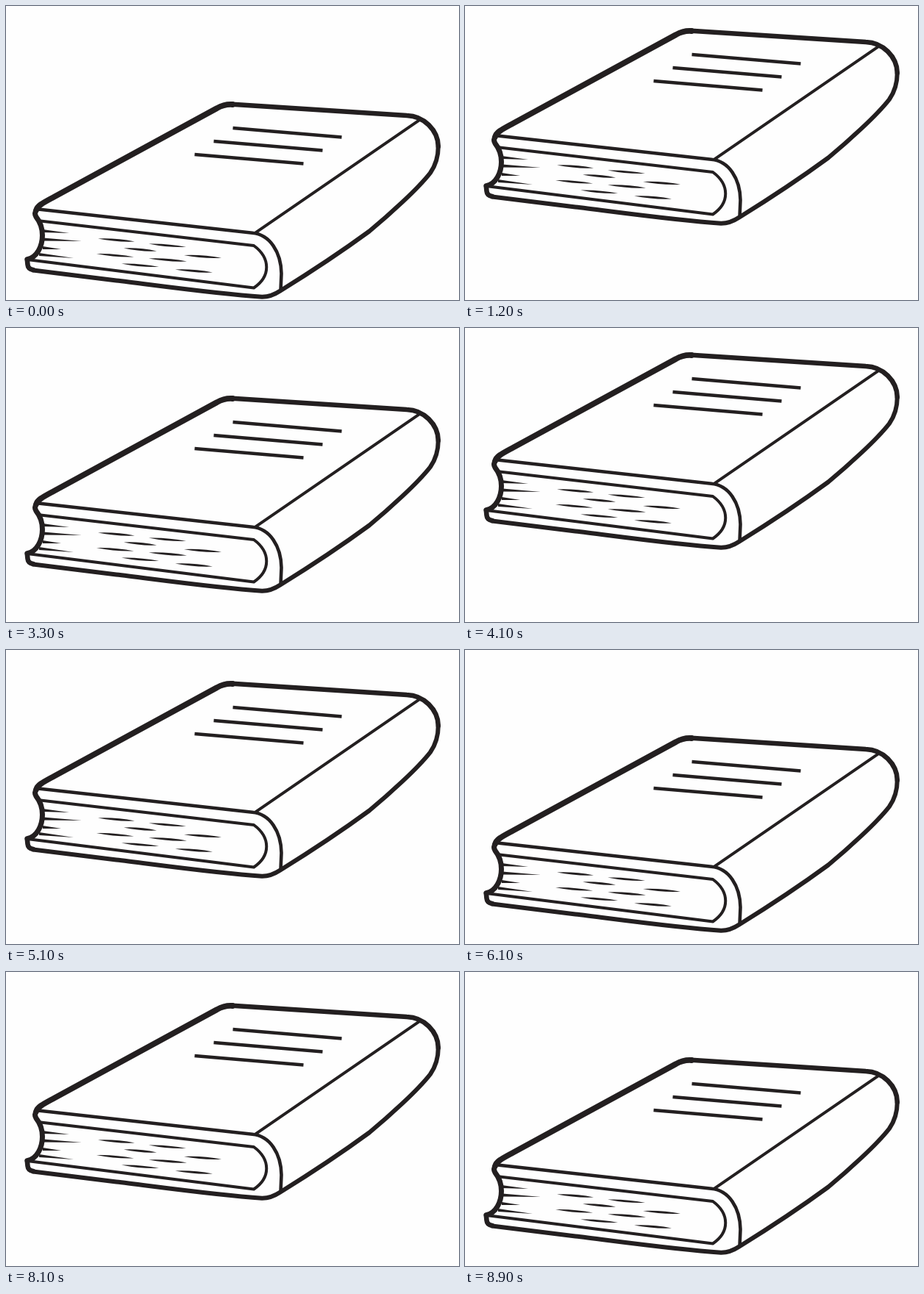
Animation of 616x400 px, one loop 9000 ms. Source, as an HTML page with a canvas:

```html
<!DOCTYPE html>
<html lang="en">
<head>
<meta charset="utf-8">
<title>Bouncing book</title>
<style>
  html, body { margin: 0; width: 100%; height: 100%; overflow: hidden; background: #fefefe; }
  canvas { display: block; }
</style>
</head>
<body>
<canvas id="stage" width="616" height="400"></canvas>
<script>
const ctx = document.getElementById('stage').getContext('2d');
const INK = '#231f20';
const PAPER = '#fefefe';
const PERIOD = 3000;
const STEP = 100;
const HEIGHT = 104;

function stroke(width, path) {
  ctx.lineWidth = width;
  ctx.stroke(new Path2D(path));
}

// Sliver that is thickest in the middle and pointed at both ends.
function sliver(x, y, length, drop) {
  const mx = x + length / 2, my = y + drop / 2;
  ctx.beginPath();
  ctx.moveTo(x, y);
  ctx.quadraticCurveTo(mx, my - 3, x + length, y + drop);
  ctx.quadraticCurveTo(mx, my + 3, x, y);
  ctx.fill();
}

// Wedge that runs out of the concave page edge to a point.
function wedge(x, y, tipX, tipY) {
  ctx.beginPath();
  ctx.moveTo(x, y - 2);
  ctx.lineTo(tipX, tipY);
  ctx.lineTo(x, y + 2);
  ctx.fill();
}

function drawPages() {
  stroke(4, 'M47 292.5 L337 326 C360 343 360 368 337 383.5 L33 345.5');
  wedge(50, 306, 86, 309);
  wedge(51, 317.5, 103, 320);
  wedge(50, 329, 75, 331);
  wedge(45, 338, 92, 343);
  sliver(125, 316.5, 50, 4);
  sliver(194, 323.5, 51, 4.5);
  sliver(160, 329.5, 45, 4);
  sliver(123, 337, 51, 4.5);
  sliver(194, 343.5, 52, 4);
  sliver(242, 339, 51, 3.7);
  sliver(157, 350.5, 51, 4.5);
  sliver(230, 358.5, 51, 4);
}

function drawBook() {
  ctx.strokeStyle = ctx.fillStyle = INK;
  ctx.lineJoin = ctx.lineCap = 'round';

  drawPages();

  // Cover front edge and spine
  stroke(4.6, 'M44 276.5 L335 308.8 C359 311 374 335 374.5 364 L373.5 387');
  stroke(4, 'M339 308.7 L561.5 155.7');

  // Outline
  stroke(7.8, 'M41 278 C43 271 52 267 66 259.3 L287 139 Q297 133.2 308 134');
  stroke(6.6, 'M308 133.7 L545 149 C568 149.5 587.5 169 587.8 191');
  stroke(6, 'M587.8 191 C587.8 206 584 217 577 227 C560 249 520 285 494 306.5 '
    + 'Q440 346 373 387.5 Q360 396 348 395.8 C280 391 190 378 150 373.5 L37 359.5');
  stroke(6.6, 'M37 359 Q30 358 29.5 352 L28.8 345');
  stroke(7, 'M29 344.7 C42 342 49.5 327 49.5 312 C49.5 300 45 292 41 287 Q37.8 282 41.5 277');

  // Title
  ctx.lineCap = 'butt';
  for (let i = 0; i < 3; i++) {
    const x = 308.5 - 26 * i, y = 166 + 18 * i;
    stroke(4.6, `M${x} ${y} l148 12.5`);
  }
}

function lift(time) {
  const phase = (time % PERIOD) / PERIOD * 2 - 1;
  return Math.ceil(HEIGHT * (1 - phase * phase));
}

const start = performance.now();

function frame() {
  const elapsed = performance.now() - start;
  const time = Math.floor(elapsed / STEP) * STEP;
  ctx.setTransform(1, 0, 0, 1, 0, 0);
  ctx.fillStyle = PAPER;
  ctx.fillRect(0, 0, 616, 400);
  ctx.translate(0, -lift(time));
  drawBook();
  requestAnimationFrame(frame);
}

frame();
</script>
</body>
</html>
```
